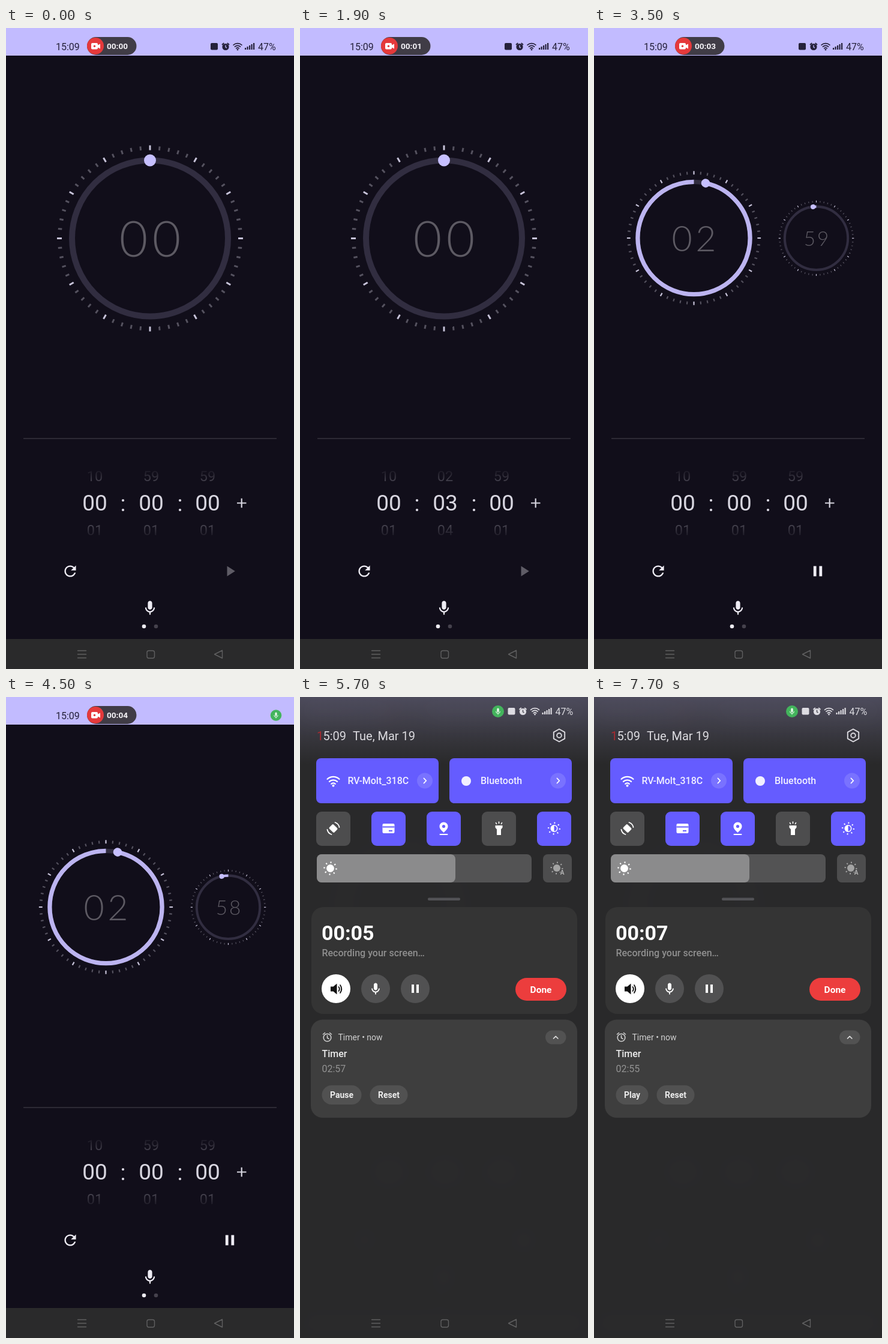
An HTML page that plays this animation: 480x1068 px, repeating every 8 s.

```html
<!DOCTYPE html>
<html lang="en">
<head>
<meta charset="utf-8">
<title>Timer</title>
<style>
html, body { margin: 0; width: 100%; height: 100%; overflow: hidden; background: #110e1a; }
svg { display: block; width: 100%; height: 100%; font-family: Roboto, sans-serif; }
text { white-space: pre; }
.mid { text-anchor: middle; }
.w5 { font-weight: 500; }
.w7 { font-weight: 700; }
.line { fill: none; stroke: currentColor; stroke-linecap: round; stroke-linejoin: round; }
.num { font-family: Lato, sans-serif; font-weight: 300; font-size: 82px; text-anchor: middle; }
.on { fill: #655cff; }
.off { fill: #4d4d4e; }
</style>
</head>
<body>
<svg viewBox="0 0 480 1068">
<defs>
  <linearGradient id="fade" gradientUnits="userSpaceOnUse" x1="0" x2="0" y1="733" y2="852">
    <stop offset="0" stop-color="#000"/><stop offset=".24" stop-color="#fff"/>
    <stop offset=".76" stop-color="#fff"/><stop offset="1" stop-color="#000"/>
  </linearGradient>
  <linearGradient id="glow" x2="0" y2="1">
    <stop offset="0" stop-color="#c2bbff"/><stop offset=".45" stop-color="#c2bbff" stop-opacity=".55"/>
    <stop offset="1" stop-color="#c2bbff" stop-opacity="0"/>
  </linearGradient>
  <mask id="wheelMask" maskUnits="userSpaceOnUse" x="100" y="730" width="290" height="125">
    <rect x="100" y="730" width="290" height="125" fill="url(#fade)"/>
  </mask>
  <path id="mic" transform="translate(-12 -11.5)" d="M12 14c1.66 0 3-1.34 3-3V5c0-1.66-1.34-3-3-3S9 3.34 9 5v6c0 1.66 1.34 3 3 3zm5-3c0 2.76-2.24 5-5 5s-5-2.24-5-5H5.2c0 3.53 2.61 6.43 5.9 6.92V21h1.8v-3.08c3.28-.48 5.9-3.38 5.9-6.92z"/>
  <path id="pauseIcon" d="M-6-7h4V7h-4zM2-7h4V7h-4z"/>
  <g id="wifi" class="line" stroke-width="1.6">
    <path d="M-7-7.2a10.5 10.5 0 0 1 14 0M-4.6-4.3a6.8 6.8 0 0 1 9.2 0M-2.3-1.6a3.4 3.4 0 0 1 4.6 0"/>
    <circle cy=".6" r=".6"/>
  </g>
  <g id="sun" fill="currentColor">
    <circle r="6"/>
    <circle r="9.3" fill="none" stroke="currentColor" stroke-width="2.4" pathLength="80" stroke-dasharray="2.6 7.4"/>
  </g>
  <g id="micDot"><circle r="10" fill="#43b45c"/><use href="#mic" fill="#e6f7e8" transform="scale(.58)"/></g>
  <g id="status" fill="currentColor">
    <rect x="341" y="25" width="12" height="11.5" rx="2"/>
    <circle cx="366" cy="31.5" r="5.6"/>
    <path class="line" stroke-width="1.8" d="M360.5 27.5l2.3-2M371.5 27.5l-2.3-2"/>
    <path d="M366 28.5v3.3l2 1.4" fill="none" stroke="var(--gap)" stroke-width="1.3"/>
    <use href="#wifi" x="386" y="35.5"/>
    <path d="M398 33h2.2v3H398zM401.5 31h2.2v5h-2.2zM405 29h2.2v7H405zM408.5 27h2.2v9h-2.2zM412 25h2.2v11H412z"/>
    <text x="420" y="36.5" font-size="16">47%</text>
  </g>
</defs>

<g id="app">
  <rect width="480" height="1068" fill="#110e1a"/>
  <rect width="480" height="46" fill="#c2bbff"/>
  <text x="83" y="36.5" font-size="16" fill="#25213a">15:09</text>
  <rect x="135" y="15" width="82.5" height="30" rx="15" fill="#403c46"/>
  <circle cx="149" cy="30" r="14" fill="#e5393b"/>
  <path d="M144 25h7q2 0 2 2v1.500l4-2v8l-4-2v1q0 2-2 2h-7q-2 0-2-2v-6.500q0-2 2-2z" fill="#fff"/>
  <circle cx="147.500" cy="30.300" r="1.700" fill="#e5393b"/>
  <text id="pillTime" class="w7" x="168" y="35" font-size="13.600" fill="#f4f2f6"></text>
  <use id="barIcons" href="#status" style="color:#25213a;--gap:#c2bbff"/>
  <use id="barMic" href="#micDot" transform="translate(450 30.500) scale(.93)"/>
  <g id="dials"></g>
  <path d="M29 684h422" stroke="#2d2a35" stroke-width="2"/>
  <g id="wheels" mask="url(#wheelMask)" fill="#d8d6e0"></g>
  <g class="mid" font-size="37" fill="#d8d6e0"><text x="195" y="804.500">:</text><text x="290" y="804.500">:</text></g>
  <path d="M385 791.500h15.500M392.700 783.800v15.500" stroke="#d8d6e0" stroke-width="2.200"/>
  <g fill="#eeecf4">
    <path transform="translate(92.600 890.600) scale(1.200)" d="M17.650 6.350C16.200 4.900 14.210 4 12 4c-4.420 0-7.990 3.580-7.990 8s3.570 8 7.990 8c3.730 0 6.840-2.550 7.730-6h-2.080c-.82 2.330-3.040 4-5.650 4-3.310 0-6-2.690-6-6s2.690-6 6-6c1.660 0 3.140.69 4.220 1.780L13 11h7V4z"/>
    <path id="play" d="M368.500 896.500v17l13.300-8.500z"/>
    <use id="pause" href="#pauseIcon" transform="translate(373 905) scale(1.200)"/>
    <use href="#mic" transform="translate(240 966) scale(1.200)"/>
    <circle cx="230" cy="997" r="3.300"/>
    <circle cx="250" cy="997" r="3.300" fill="#45424d"/>
  </g>
  <rect y="1018" width="480" height="50" fill="#2a2a2b"/>
</g>

<g id="shade">
  <rect id="veil" width="480" height="1068" fill="#2a2a2c"/>
  <rect id="topGlow" width="480" height="112" fill="url(#glow)"/>
  <g id="panel">
    <use href="#micDot" x="330" y="24"/>
    <use href="#status" transform="translate(5.500 -7)" style="color:#dddce2;--gap:#45444e"/>
    <g font-size="20" fill="#dcdbe0">
      <text x="28" y="71.500" fill="#a82a30">1</text><text x="38.500" y="71.500">5:09</text>
      <text x="88" y="71.500">Tue, Mar 19</text>
    </g>
    <g class="line" color="#dcdbe0" stroke-width="1.900">
      <path d="M432 53.500l9.200 5.200v10.600l-9.200 5.200-9.200-5.200v-10.600z"/><circle cx="432" cy="64" r="3.800"/>
    </g>
    <g class="on">
      <rect x="27" y="102" width="204" height="75" rx="8"/><rect x="249" y="102" width="204" height="75" rx="8"/>
      <g fill="#7972ff"><circle cx="208" cy="139.500" r="13"/><circle cx="430" cy="139.500" r="13"/></g>
    </g>
    <g color="#fff" fill="#f1f0ff">
      <use href="#wifi" transform="translate(55.500 147) scale(1.420)"/>
      <circle cx="277" cy="140" r="8"/>
      <text class="w5" x="79.500" y="145" font-size="16">RV-Molt_318C</text>
      <text class="w5" x="301" y="145" font-size="16">Bluetooth</text>
      <path class="line" stroke-width="1.800" d="M206.500 135.500l3.800 4-3.800 4M428.500 135.500l3.800 4-3.800 4"/>
    </g>
    <g id="tiles"></g>
    <g color="#fff" fill="#fff">
      <rect x="-5" y="-6" width="10" height="12" rx="2" transform="translate(55.500 219) rotate(-45)"/>
      <path class="line" stroke-width="1.800" d="M45.500 221a10.500 10.500 0 0 0 7 8M65.500 217a10.500 10.500 0 0 0-7-8"/>
      <rect x="137.500" y="211" width="20" height="16" rx="2"/>
      <path d="M137.500 216.500h20M148 223h6" stroke="#655cff" stroke-width="2"/>
      <path d="M239.500 226c-4-4-7-6.500-7-10.500a7 7 0 0 1 14 0c0 4-3 6.500-7 10.500z"/>
      <circle cx="239.500" cy="215.500" r="2.600" fill="#655cff"/>
      <path class="line" stroke-width="2" d="M233.500 229h12"/>
      <path d="M325.500 214h12v3.500l-2.500 3V230h-7v-9.500l-2.500-3z"/>
      <path class="line" stroke-width="1.600" d="M326.500 209.500l1 2M331.500 208v2.500M336.500 209.500l-1 2"/>
      <use href="#sun" x="423.500" y="219"/>
      <path d="M423.500 214.500a4.500 4.500 0 0 1 0 9z" fill="#655cff"/>
    </g>
    <rect x="28" y="262" width="358" height="47" rx="8" fill="#535354"/>
    <rect x="28" y="262" width="231" height="47" rx="8" fill="#8b8b8c"/>
    <use href="#sun" transform="translate(50.500 285.500) scale(1.070)" color="#fff"/>
    <rect class="off" x="405" y="262" width="48" height="47" rx="8"/>
    <use href="#sun" x="428" y="285" color="#a4a4a4"/>
    <text class="w7 mid" x="437" y="296" font-size="10" fill="#b4b4b4" stroke="#4d4d4e" stroke-width="2" paint-order="stroke">A</text>
    <rect x="213" y="334.500" width="54" height="4.500" rx="2" fill="#525256"/>
    <rect id="card" x="19" y="350" width="443" rx="20" fill="#343434"/>
    <text id="recTime" class="w7" x="36" y="405" font-size="34" fill="#fff"></text>
    <circle id="sound" fill="#fff"/>
    <g id="details">
      <text class="w5" x="36.500" y="432" font-size="16" fill="#8f8f8f">Recording your screen…</text>
      <path d="M51 482.500h4.500l6-5v18l-6-5H51z" fill="#111"/>
      <path class="line" color="#111" stroke-width="1.800" d="M64.500 483q2.500 3.500 0 7M67 480q4.500 6.500 0 13"/>
      <g fill="#515152"><circle cx="126" cy="486" r="24"/><circle cx="192" cy="486" r="24"/></g>
      <g fill="#fff"><use href="#mic" x="126" y="486"/><use href="#pauseIcon" x="192" y="486"/></g>
      <rect x="359" y="468" width="85" height="38" rx="19" fill="#ec3d3d"/>
      <text class="w7 mid" x="401.500" y="492.500" font-size="15.500" fill="#fff">Done</text>
      <rect x="18" y="537.500" width="444" height="163.500" rx="20" fill="#3e3e3e"/>
      <g class="line" color="#d0d0d0" stroke-width="1.600">
        <circle cx="45.500" cy="567.500" r="6.300"/>
        <path d="M38.500 562l3-2.500M52.500 562l-3-2.500M45.500 564v4l2.500 1.500"/>
      </g>
      <text x="63.500" y="571.500" font-size="14" fill="#d0d0d0">Timer • now</text>
      <rect x="409" y="555.500" width="34.500" height="23" rx="11.500" fill="#525252"/>
      <path class="line" color="#ddd" stroke-width="1.700" d="M422.500 569l3.700-3.700 3.700 3.700"/>
      <text class="w5" x="36.500" y="599.500" font-size="16" fill="#ebebeb">Timer</text>
      <text id="left" x="36.500" y="624.500" font-size="16" fill="#929292"></text>
      <g class="w7 mid" font-size="14" fill="#ededed">
        <rect id="toggleBox" x="36.500" y="647" height="32" rx="16" fill="#515151"/>
        <text id="toggle" y="668"></text>
        <g id="reset"><rect x="-31.500" y="647" width="63" height="32" rx="16" fill="#515151"/><text y="668">Reset</text></g>
      </g>
    </g>
  </g>
</g>

<g class="line" color="#606061" stroke-width="1.400">
  <path d="M119.500 1037.500h14M119.500 1043.500h14M119.500 1049.500h14M347.500 1043.500l13-6.500v13z"/>
  <rect x="235" y="1037.500" width="12.500" height="12.500" rx="3"/>
</g>
</svg>

<script>
const LOOP = 8000;
const T = { spin: [600, 1500], add: [2300, 2600], start: 3000, mic: 4200, stop: 7400 };
const PULL = [[4600, 0], [4800, .15], [5100, .5], [5400, 1]];

const $ = id => document.getElementById(id);
const clamp = x => Math.max(0, Math.min(1, x));
const mix = (a, b, k) => a + (b - a) * k;
const ease = x => x * x * (3 - 2 * x);
const span = (t, [a, b]) => ease(clamp((t - a) / (b - a)));
const two = n => String(n).padStart(2, '0');
const clock = s => two(Math.floor(s / 60)) + ':' + two(s % 60);
const show = (node, on) => node.style.display = on ? '' : 'none';

function set(node, attrs) {
  for (const k in attrs) node.setAttribute(k, attrs[k]);
  return node;
}
function add(parent, tag, attrs) {
  const node = document.createElementNS('http://www.w3.org/2000/svg', tag);
  return parent.appendChild(set(node, attrs));
}

function makeDial(x, y, scale) {
  const g = add($('dials'), 'g', { transform: `translate(${x} ${y}) scale(${scale})` });
  for (let i = 0; i < 60; i++) {
    const major = i % 5 === 0;
    add(g, 'path', {
      d: major ? 'M0-147v-8' : 'M0-147.500v-6.500', transform: `rotate(${i * 6})`,
      stroke: major ? '#c8c4da' : '#55525f', 'stroke-width': 3
    });
  }
  const ring = { r: 130, fill: 'none', 'stroke-width': 10, transform: 'rotate(-90)' };
  add(g, 'circle', { ...ring, stroke: '#312d40' });
  const arc = add(g, 'circle', { ...ring, stroke: '#bcb4f0', pathLength: 60 });
  const knob = add(g, 'circle', { cy: -130, r: 10, fill: '#c6bfff' });
  const digits = [-27.5, 27.5].map(dx => add(g, 'text', { class: 'num', x: dx, y: 30.5, fill: '#5d5a63' }));
  return {
    g,
    value(v) {
      show(arc, v > 0);
      set(arc, { 'stroke-dasharray': `0 ${v} ${60 - v} 60` });
      set(knob, { transform: `rotate(${v * 6})` });
      digits.forEach((d, i) => d.textContent = two(v)[i]);
    }
  };
}

function makeWheel(x, count) {
  const rows = [-1, 0, 1, 2].map(() => add($('wheels'), 'text', { class: 'mid', x }));
  return pos => rows.forEach((row, i) => {
    const n = Math.floor(pos) + i - 1;
    const d = n - pos, far = Math.min(1, Math.abs(d));
    const size = mix(37, 23.5, far);
    row.textContent = two((n + count) % count);
    set(row, { y: 791.3 + 45 * d + size * .356, 'font-size': size, opacity: mix(1, .32, far) });
  });
}

const single = makeDial(240, 350.5, 1);
const minutes = makeDial(166.5, 350, .72);
const seconds = makeDial(370.5, 350.3, .405);
const hourWheel = makeWheel(148, 11), minuteWheel = makeWheel(242, 60), secondWheel = makeWheel(336, 60);
[0, 1, 1, 0, 1].forEach((on, i) => add($('tiles'), 'rect', {
  class: on ? 'on' : 'off', x: 27 + 92 * i, y: 191, width: 57, height: 57, rx: 9
}));
single.value(0);
hourWheel(0);
secondWheel(0);

function pullAt(t) {
  for (let i = 1; i < PULL.length; i++) {
    const [a, u] = PULL[i - 1], [b, v] = PULL[i];
    if (t < b) return mix(u, v, clamp((t - a) / (b - a)));
  }
  return 1;
}

function drawShade(s, paused) {
  show($('shade'), s > 0);
  $('app').style.filter = s > 0 ? `blur(${Math.min(14, s * 30)}px)` : 'none';
  if (!s) return;
  const late = clamp((s - .6) / .4), k = clamp((s - .5) * 2);
  set($('veil'), { opacity: Math.min(.975, s * 2) });
  set($('topGlow'), { opacity: mix(.42, .22, k) });
  set($('panel'), { transform: `translate(0 ${-490 * (1 - s)})`, opacity: clamp(s * 3) });
  set($('card'), { height: mix(55, 178, k), opacity: mix(.5, 1, k) });
  set($('recTime'), { opacity: mix(.68, 1, k) });
  set($('sound'), { cx: mix(51, 60, k), cy: mix(444.5, 486, k), r: mix(11, 24, k), opacity: mix(.65, 1, k) });
  set($('details'), { opacity: late });
  const w = paused ? 54 : 66;
  $('toggle').textContent = paused ? 'Play' : 'Pause';
  set($('toggleBox'), { width: w });
  set($('toggle'), { x: 36.5 + w / 2 });
  set($('reset'), { transform: `translate(${w + 82} 0)` });
}

function draw(t) {
  const rec = clock(Math.max(0, Math.floor((t - 300) / 1000)));
  $('pillTime').textContent = rec;
  $('recTime').textContent = rec;

  const added = t >= T.add[0], running = t >= T.start;
  minuteWheel(3 * (span(t, T.spin) - span(t, T.add)));
  show(single.g, !added);
  show(minutes.g, added);
  show(seconds.g, added);
  const elapsed = Math.max(0, Math.min(t, T.stop) - T.start) / 1000;
  const left = running ? Math.floor(179.999 - elapsed) : 180;
  minutes.value(Math.floor(left / 60));
  seconds.value(left % 60);
  $('left').textContent = clock(left);

  show($('play'), !running);
  show($('pause'), running);
  set($('play'), { fill: added ? '#eeecf4' : '#5f5c66' });
  show($('barIcons'), t < T.mic);
  show($('barMic'), t >= T.mic);
  drawShade(pullAt(t), t >= T.stop);
}

const begin = performance.now();
function tick() {
  draw((performance.now() - begin) % LOOP);
  requestAnimationFrame(tick);
}
tick();
</script>
</body>
</html>
```
